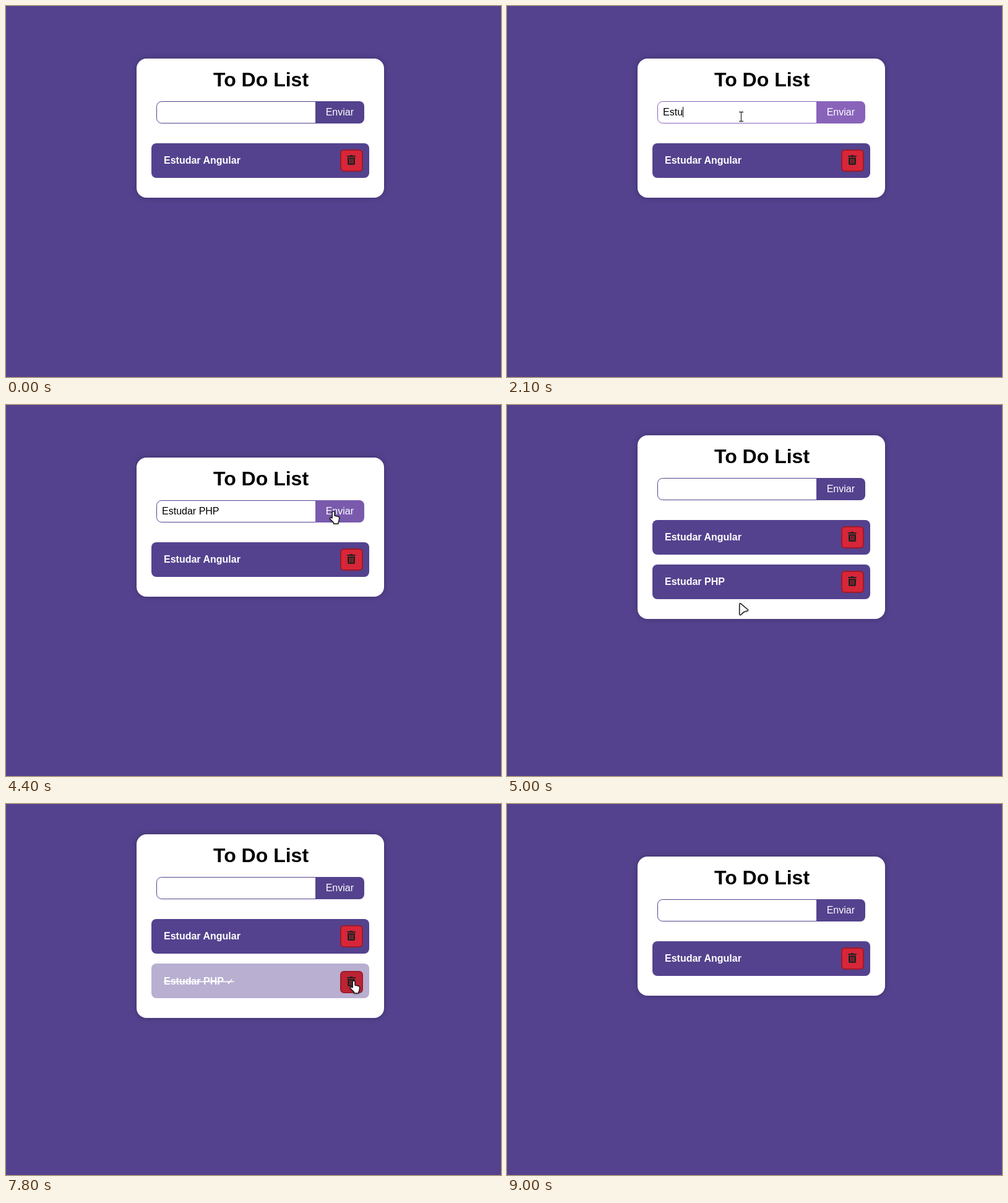
An HTML page that plays this animation: 800x600 px, repeating every 10 s.

```html
<!DOCTYPE html>
<html lang="pt">
<head>
<meta charset="utf-8">
<title>To Do List</title>
<style>
  :root { --purple: #54428e; --violet: #8963ba; --red: #d72638; }
  html, body { margin: 0; width: 100%; height: 100%; overflow: hidden; background: var(--purple); }
  svg { display: block; width: 800px; height: 600px; font: 16px "Liberation Sans", Arial, sans-serif; }

  .anim, .typed tspan { animation: 10s step-end infinite; }
  .title { font-size: 32px; font-weight: bold; }
  .label { fill: #fff; font-weight: bold; }
  .strike { text-decoration: line-through; }
  .check { font: 15px "DejaVu Sans", sans-serif; }
  .bar { fill: var(--purple); }
  .bin { fill: var(--red); stroke: #a01a2b; stroke-width: 2; }
  .slits { stroke: var(--red); }

  /* Panel grows while the second task exists */
  .panel { animation-name: panel; }
  .card { fill: #fff; filter: drop-shadow(0 0 5px rgba(0, 0, 0, .25)); animation-name: card; }
  .second { animation-name: second; }
  @keyframes panel { 0%, 82% { transform: none } 45% { transform: translateY(-36px) } }
  @keyframes card { 0%, 82% { height: 225px } 45% { height: 297px } }
  @keyframes second { 0%, 82% { visibility: hidden } 45% { visibility: visible } }

  /* Form */
  .field { fill: #fff; animation-name: field; }
  .send { animation-name: send; }
  @keyframes field { 0%, 43% { stroke: #54428e } 11% { stroke: #8963ba } }
  @keyframes send {
    0%, 46% { fill: #54428e }
    11% { fill: #6f52a4 }
    12% { fill: #8963ba }
    43% { fill: #8360b5 }
    44% { fill: #795aad }
    45% { fill: #6850a0 }
  }

  /* Typing: each letter appears at its own moment, the whole text goes on submit */
  .typed { white-space: pre; animation-name: typed; }
  .typed tspan { animation-name: key; animation-delay: calc(var(--at) - 10s); }
  @keyframes typed { 0% { opacity: 1 } 45% { opacity: 0 } }
  @keyframes key { 0% { fill-opacity: 1 } 40% { fill-opacity: 0 } }
  .caret { animation-name: caret; }
  @keyframes caret {
    0%, 38% { opacity: 0; x: 253px }
    11% { opacity: 1; x: 253px }
    13% { opacity: 1; x: 262px }
    17% { opacity: 1; x: 270px }
    19% { opacity: 1; x: 275px }
    21% { opacity: 1; x: 284px }
    23% { opacity: 1; x: 293px }
    24% { opacity: 1; x: 302px }
    25% { opacity: 1; x: 307px }
    26% { opacity: 1; x: 311px }
    30% { opacity: 1; x: 322px }
    32% { opacity: 1; x: 333px }
    33% { opacity: 1; x: 344px }
  }

  /* Second task: open, done, hovered bin */
  .second .bar { animation-name: fade; }
  .open { animation-name: open; }
  .done { animation-name: done; }
  .press { animation-name: press; }
  .press .bin, .press .slits { animation-name: hover; }
  @keyframes fade { 0% { fill: #54428e } 58% { fill: #b8afd1 } }
  @keyframes open { 0% { opacity: 1 } 58% { opacity: 0 } }
  @keyframes done { 0% { opacity: 0 } 58% { opacity: 1 } }
  @keyframes press { 0% { transform: none } 76% { transform: translateY(2px) } }
  @keyframes hover { 0% { --red: #d72638 } 76% { --red: #bd2333 } }

  /* Pointer: path in 100 ms steps */
  .pointer { animation-name: path; }
  .arrow { animation-name: arrow; }
  .beam { animation-name: beam; }
  .hand { animation-name: hand; }
  .arrow, .hand { fill: #fff; stroke: #1c1c1c; stroke-width: 1.5; stroke-linejoin: round;
    filter: drop-shadow(0 1px 1px rgba(0, 0, 0, .25)); }
  @keyframes path {
    0% { transform: translate(0, 42px) }
    2% { transform: translate(0, 42px); animation-timing-function: steps(8) }
    10% { transform: translate(378px, 179px) }
    38% { transform: translate(400px, 183px) }
    39% { transform: translate(440px, 193px) }
    40% { transform: translate(478px, 191px) }
    41% { transform: translate(518px, 180px) }
    43% { transform: translate(529px, 172px) }
    45% { transform: translate(529px, 172px); animation-timing-function: steps(5) }
    50% { transform: translate(375px, 320px); animation-timing-function: steps(3) }
    53% { transform: translate(374px, 303px) }
    56% { transform: translate(368px, 293px) }
    61% { transform: translate(368px, 293px); animation-timing-function: steps(4) }
    65% { transform: translate(252px, 317px); animation-timing-function: steps(2) }
    67% { transform: translate(168px, 316px); animation-timing-function: steps(4) }
    71% { transform: translate(698px, 298px) }
    72% { transform: translate(689px, 290px) }
    73% { transform: translate(598px, 277px) }
    74% { transform: translate(598px, 277px); animation-timing-function: steps(4) }
    78% { transform: translate(562px, 286px) }
    85% { transform: translate(562px, 286px); animation-timing-function: steps(4) }
    89%, 100% { transform: translate(17px, 4px) }
  }
  @keyframes arrow {
    0%, 9%, 41%, 52%, 76%, 90% { visibility: hidden }
    2%, 39%, 46%, 63%, 82% { visibility: visible }
  }
  @keyframes beam { 0%, 39% { visibility: hidden } 9% { visibility: visible } }
  @keyframes hand {
    0%, 46%, 63%, 82% { visibility: hidden }
    41%, 52%, 76% { visibility: visible }
  }
</style>
</head>
<body>
<svg viewBox="0 0 800 600">
  <defs>
    <g id="bin">
      <rect class="bin anim" x="1" y="1" width="35" height="34" rx="5"/>
      <path fill="#222" d="M12 10h3.5l.7-1h3.6l.7 1H24q1 0 1 1t-1 1H12q-1 0-1-1t1-1zM12 13h12v10q0 2-2 2h-8q-2 0-2-2z"/>
      <path class="slits anim" d="M15.5 15v8M18 15v8M20.5 15v8"/>
    </g>
  </defs>

  <g class="panel anim">
    <rect class="card anim" x="211" y="85" width="400" height="225" rx="16"/>
    <text class="title" x="335" y="130">To Do List</text>

    <path class="field anim" d="M501 154.5H251.5a8 8 0 0 0-8 8v19a8 8 0 0 0 8 8H501z"/>
    <path class="send anim" d="M500 154h71a8 8 0 0 1 8 8v20a8 8 0 0 1-8 8h-71z"/>
    <text x="516.7" y="177" fill="#fff">Enviar</text>
    <text class="typed anim" x="252" y="177" xml:space="preserve"><tspan style="--at:1.3s">E</tspan><tspan style="--at:1.7s">s</tspan><tspan style="--at:1.9s">t</tspan><tspan style="--at:2.1s">u</tspan><tspan style="--at:2.3s">d</tspan><tspan style="--at:2.4s">a</tspan><tspan style="--at:2.5s">r</tspan><tspan style="--at:2.6s"> </tspan><tspan style="--at:3s">P</tspan><tspan style="--at:3.2s">H</tspan><tspan style="--at:3.3s">P</tspan></text>
    <rect class="caret anim" x="253" y="163" width="1" height="17"/>

    <rect class="bar" x="235" y="222" width="352" height="56" rx="8"/>
    <text class="label" x="255" y="255">Estudar Angular</text>
    <use href="#bin" x="540" y="232"/>

    <g class="second anim">
      <rect class="bar anim" x="235" y="294" width="352" height="56" rx="8"/>
      <text class="label open anim" x="255" y="327">Estudar PHP</text>
      <text class="label strike done anim" x="255" y="328">Estudar PHP <tspan class="check">✓</tspan></text>
      <g class="press anim">
        <g transform="translate(540 304)">
          <rect class="bin anim" x="1" y="1" width="35" height="34" rx="5"/>
          <path fill="#222" d="M12 10h3.5l.7-1h3.6l.7 1H24q1 0 1 1t-1 1H12q-1 0-1-1t1-1zM12 13h12v10q0 2-2 2h-8q-2 0-2-2z"/>
          <path class="slits anim" d="M15.5 15v8M18 15v8M20.5 15v8"/>
        </g>
      </g>
    </g>
  </g>

  <g class="pointer anim">
    <path class="arrow anim" d="M.8 2.4Q.8-.2 2.9 1.4L14 10.8Q15.4 12.3 13.4 13L8.2 14.4 3.4 18.8Q.8 20.4.8 17.8z"/>
    <g class="beam anim" fill="none">
      <path stroke="#fff" stroke-opacity=".6" stroke-width="2.5" d="M.5-7.5v15"/>
      <path stroke="#333" stroke-width="1.3" d="M-3-7.5h7M.5-7.5v15M-3 7.5h7"/>
    </g>
    <path class="hand anim" transform="translate(-7 -1)" d="M5.2 11.8V2.8a1.9 1.9 0 0 1 3.8 0V8l6.2 1.5q1.6.5 1.5 2.2l-.6 4.3q-.3 2-1.2 3.2V21H7.6v-1.6L1.7 13.4q-.8-1.2.2-2 1.1-.8 2.2.2z"/>
  </g>
</svg>
</body>
</html>
```
